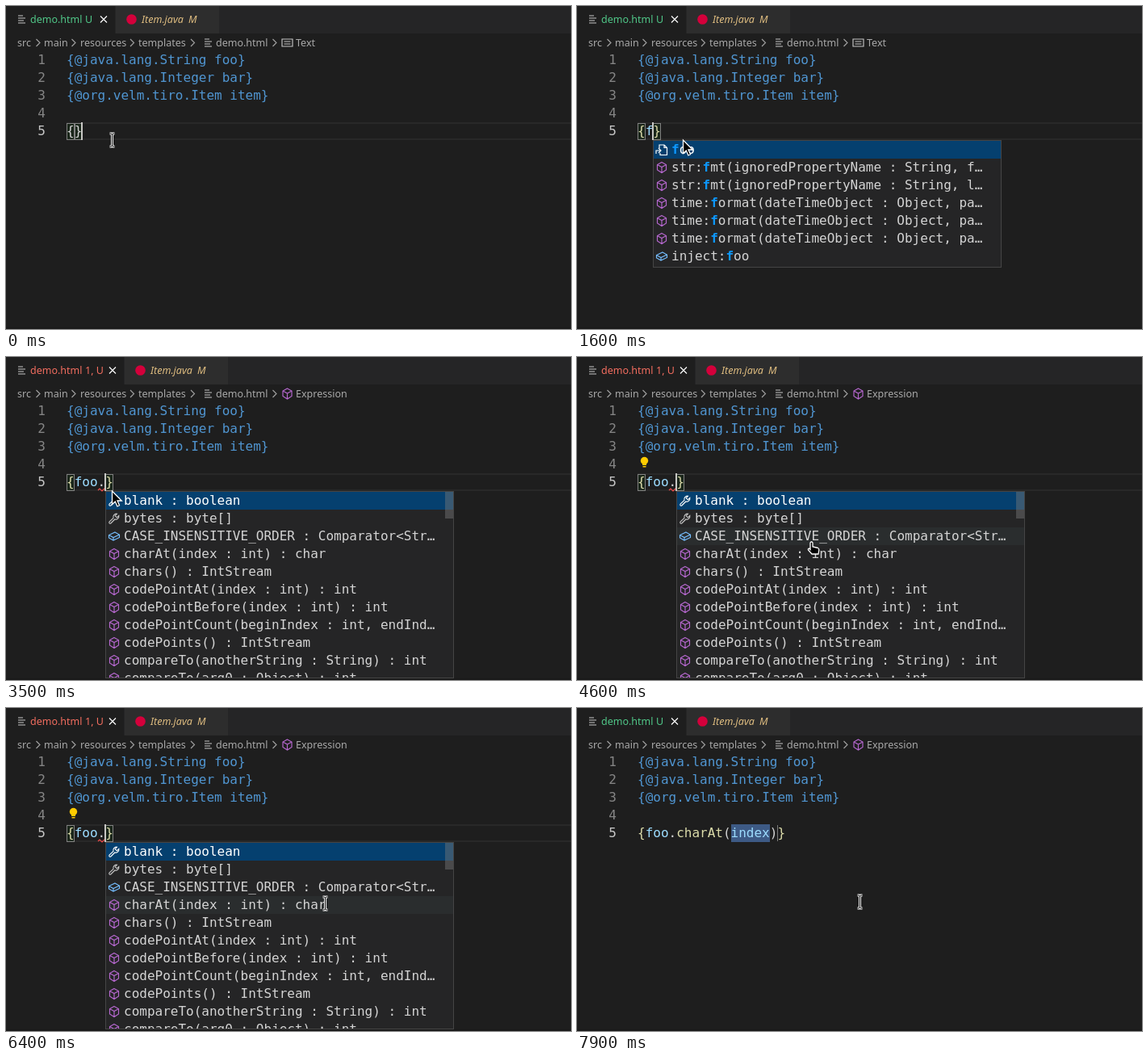
Animation of 700 by 400 pixels, one loop 8 s. Source, as an HTML page with a canvas:

```html
<!DOCTYPE html>
<html lang="en">
<head>
<meta charset="utf-8">
<title>Editor completion</title>
<style>
html, body { margin: 0; height: 100%; overflow: hidden; background: #1e1e1e; }
canvas { display: block; }
</style>
</head>
<body>
<canvas width="700" height="400"></canvas>
<script>
const ctx = document.querySelector('canvas').getContext('2d');
const LOOP = 8000, LEFT = 75, ROW = 22, CHAR = 9.632;
const MONO = '16px "DejaVu Sans Mono", monospace';
const UI = '12.5px "Noto Sans", sans-serif';
const FG = '#d4d4d4', YELLOW = '#dcdcaa', BLUE = '#9cdcfe', KEYWORD = '#5096d2';
const PURPLE = '#b768d0', CYAN = '#75beff', GRAY = '#c5c5c5';

const BLINKS = [400, 700, 1200, 1500, 2700, 3200, 3800, 4200, 4700, 5200, 5700, 6300, 6900, 7400, 7900];
const HEADER = ['{@java.lang.String foo}', '{@java.lang.Integer bar}', '{@org.velm.tiro.Item item}'];
const FORMAT = ['method', 'time:format(dateTimeObject : Object, pa…'];
const MATCHES = [
  ['reference', 'foo'],
  ['method', 'str:fmt(ignoredPropertyName : String, f…'],
  ['method', 'str:fmt(ignoredPropertyName : String, l…'],
  FORMAT, FORMAT, FORMAT,
  ['field', 'inject:foo']
];
const MEMBERS = [
  ['property', 'blank : boolean'],
  ['property', 'bytes : byte[]'],
  ['field', 'CASE_INSENSITIVE_ORDER : Comparator<Str…'],
  ...['charAt(index : int) : char', 'chars() : IntStream', 'codePointAt(index : int) : int',
    'codePointBefore(index : int) : int', 'codePointCount(beginIndex : int, endInd…',
    'codePoints() : IntStream', 'compareTo(anotherString : String) : int',
    'compareTo(arg0 : Object) : int'].map(label => ['method', label])
];

const ICONS = {
  method: [PURPLE, 'M0-6.5L5.5-3.5V3L0 6.5-5.5 3V-3.5ZM-5.5-3.5L0-.5 5.5-3.5M0-.5V6.5'],
  field: [CYAN, 'M1-5L6.5-2V1.5L-1 5-6.5 2V-1.5ZM-6.5-1.5L-1 1.5 6.5-2M-1 1.5V5'],
  property: [GRAY, 'M3.5-5.8A4 4 0 0 0-1-.6L-6 4.2A1.3 1.3 0 0 0-4.2 6L.8 1A4 4 0 0 0 5.8-3.5L3.3-1.2 1.2-3.3Z'],
  reference: [GRAY, 'M-3-2V-6H3L6.5-2.5V6.5H-2V4M3-6V-2.5H6.5M-7 5V1H-1M-4-2L-1 1-4 4'],
  chevron: ['#a0a0a0', 'M-2-4.5L2.5 0-2 4.5'],
  close: ['#ffffff', 'M-4-4L4 4M4-4L-4 4'],
  lines: [GRAY, 'M-4.5-4.5H1.5M-4.5-1.5H4.5M-4.5 1.5H2.5M-4.5 4.5H4.5'],
  text: [GRAY, 'M-6.5-4.5H6.5V4.5H-6.5ZM-4-1.5H4M-4 1.5H4']
};
const ARROW = 'M0 0V16.5L3.8 13 6.4 19 9 17.8 6.5 12H11.8Z';
const HAND = 'M-1.5 1Q0-1.5 1.5 1V6L8 7.5Q9.5 8 9.3 10L8.5 15H.5L-4 10Q-4.5 8-2.8 8.2L-1.5 9.5Z';
const BEAM = 'M-3-8H-1L0-7 1-8H3M0-7V7M-3 8H-1L0 7 1 8H3';

function rect(color, x, y, w, h) {
  ctx.fillStyle = color;
  ctx.fillRect(x, y, w, h);
}

function frame(color, x, y, w, h) {
  ctx.strokeStyle = color;
  ctx.lineWidth = 1;
  ctx.strokeRect(x + .5, y + .5, w - 1, h - 1);
}

function text(str, x, y, color, font = MONO) {
  ctx.font = font;
  ctx.fillStyle = color;
  ctx.fillText(str, x, y);
}

function shape(d, x, y, stroke, width = 1, fill) {
  const path = new Path2D(d);
  ctx.save();
  ctx.translate(x, y);
  ctx.lineWidth = width;
  ctx.strokeStyle = stroke;
  if (fill) { ctx.fillStyle = fill; ctx.fill(path); }
  ctx.stroke(path);
  ctx.restore();
}

function icon(name, x, y, color = ICONS[name][0]) {
  shape(ICONS[name][1], x, y, color, 1.15);
}

function disc(color, x, y, r) {
  ctx.fillStyle = color;
  ctx.beginPath();
  ctx.arc(x, y, r, 0, 7);
  ctx.fill();
}

// Draws [string, colour] runs one after another on the character grid.
function runs(list, x, y) {
  for (const [str, color, font] of list) {
    text(str, x, y, color, font);
    x += str.length * CHAR;
  }
}

const column = n => Math.round(LEFT + n * CHAR);

function drawTabs(error) {
  const shift = error ? 11 : 0, color = error ? '#f26d5f' : '#50c788';
  rect('#252526', 0, 0, 700, 34);
  rect('#1e1e1e', 0, 0, 135 + shift, 34);
  rect('#2d2d2d', 136 + shift, 0, 128, 34);
  icon('lines', 19.5, 16.5);
  text('demo.html', 30, 21, color, UI);
  text(error ? '1, U' : 'U', 98, 21, color, UI);
  icon('close', 121 + shift, 16.5);
  disc('#d4003b', 155.5 + shift, 16.5, 6.3);
  text('Item.java', 168 + shift, 21, '#dfbd80', 'italic ' + UI);
  text('M', 226 + shift, 21, '#dfbd80', 'italic ' + UI);
}

function drawBreadcrumbs(expression) {
  const parts = [['src', 14, 39.5], ['main', 47, 83.5], ['resources', 92, 156], ['templates', 164, 231], ['demo.html', 260, 332.5]];
  for (const [name, x, chevron] of parts) {
    text(name, x, 50, '#a9a9a9', UI);
    icon('chevron', chevron, 45.5);
  }
  icon('lines', 250.5, 45.5);
  icon(expression ? 'method' : 'text', 348.5, 45.5);
  text(expression ? 'Expression' : 'Text', 359, 50, '#a9a9a9', UI);
}

function drawCode(t, typed, done) {
  if (!done) {
    rect('#282828', LEFT, 144, 625, 2);
    rect('#282828', LEFT, 164, 625, 2);
    for (const n of [0, typed.length + 1]) {
      rect('rgba(0,100,0,.12)', column(n), 145, 10, 20);
      frame('#808080', column(n), 145, 10, 21);
    }
  } else {
    rect('#3d5a85', column(12), 144, column(17) - column(12), ROW);
    rect('#7c7c7c', column(18), 145, 1, 20);
  }
  ctx.textAlign = 'right';
  for (let i = 1; i <= 5; i++) text(i, 49, 50 + ROW * i, i < 5 ? '#858585' : '#c6c6c6');
  ctx.textAlign = 'left';
  HEADER.forEach((line, i) => text(line, LEFT, 72 + ROW * i, KEYWORD));

  const brace = typed ? YELLOW : FG;
  const body = done
    ? [['foo', BLUE], ['.', FG], ['charAt', YELLOW], ['(', FG], ['index', BLUE], [')', FG]]
    : [[typed.slice(0, 3), BLUE], [typed.slice(3), FG]];
  runs([['{', brace], ...body, ['}', brace]], LEFT, 160);

  if (t >= 3500 && t < 6500) shape('M0 2L2 0 5 3 8 0 10 2', 114, 163, '#f14c4c', 1.2);
  if (t >= 3900 && t < 6500) {
    disc('#ffcc00', 83.5, 128.5, 4.7);
    rect('#ffcc00', 81, 131, 5, 3);
    rect('#ffcc00', 81.5, 135, 4, 1.5);
  }
  if (BLINKS.filter(b => b <= t).length % 2 === 0) {
    const n = t < 700 ? 2 : done ? 17 : typed.length + 1;
    rect('#c8c8c4', column(n) - 1, 144, 2, ROW);
  }
}

function drawPopup(items, x, typed, hover) {
  const members = items === MEMBERS;
  const height = members ? 232 : items.length * ROW + 4;
  ctx.save();
  ctx.beginPath();
  ctx.rect(x, 166, 432, height);
  ctx.clip();
  rect('#252526', x, 166, 432, height);
  items.forEach(([kind, label], i) => {
    const y = 167 + i * ROW, selected = i === 0, color = selected ? '#ffffff' : FG;
    if (selected) rect('#05406f', x + 1, y, 430, ROW);
    else if (i === hover) rect('#2a2d2e', x + 1, y, 430, ROW);
    icon(kind, x + 11, y + 11, selected ? '#ffffff' : undefined);
    const at = members ? 0 : label.indexOf(typed), end = members ? 0 : at + typed.length;
    runs([[label.slice(0, at), color], [label.slice(at, end), '#0d98ff', 'bold ' + MONO], [label.slice(end), color]], x + 23, y + 16);
  });
  if (members) rect('rgba(121,121,121,.45)', x + 421, 167, 10, 33);
  frame('#454545', x, 166, 432, height);
  ctx.restore();
}

function mouseAt(t) {
  const mix = (a, b, p) => a.map((v, i) => Math.round(v + (b[i] - v) * p));
  const rest = [131, 166], pass = [290, 229], pick = [394, 241], click = [395, 242];
  if (t < 3800) return rest;
  if (t < 4600) return mix(rest, pass, (1 - Math.cos(Math.PI * (t - 3800) / 800)) / 2);
  if (t < 5400) return mix(pass, pick, Math.sin(Math.PI / 2 * (t - 4600) / 800));
  if (t < 6400) return t < 5800 ? pick : [395, 240];
  const p = Math.min(1, Math.max(0, (t - 6800) / 600));
  return mix(click, [350, 240], p * p * (3 - 2 * p));
}

function drawMouse(t, [x, y], popup) {
  if (!popup || t >= 6400) {
    shape(BEAM, x + .5, y, '#ffffff', 3);
    shape(BEAM, x + .5, y, '#000000', 1);
  } else {
    shape(t > 3900 ? HAND : ARROW, x + .5, y, '#ffffff', 1.3, '#000000');
  }
}

function draw(t) {
  const done = t >= 6500;
  const typed = t < 1500 ? '' : t < 1700 ? 'f' : t < 2100 ? 'fo' : t < 3300 ? 'foo' : 'foo.';
  let items = null;
  if (t >= 3400 && !done) items = MEMBERS;
  else if (t >= 1600 && t < 3300) items = MATCHES.filter(([, label]) => label.includes(typed));
  const mouse = mouseAt(t);

  rect('#1e1e1e', 0, 0, 700, 400);
  drawTabs(t >= 3500 && t < 6600);
  drawBreadcrumbs(t >= 2100);
  drawCode(t, typed, done);
  if (items) drawPopup(items, column(typed.length + 1), typed, Math.floor((mouse[1] - 167) / ROW));
  rect('#1a1a1a', 0, 398, 700, 2);
  drawMouse(t, mouse, items);
}

const start = performance.now();
function tick() {
  const t = (performance.now() - start) % LOOP;
  draw(Math.floor(t / 100) * 100);
  requestAnimationFrame(tick);
}
tick();
</script>
</body>
</html>
```
